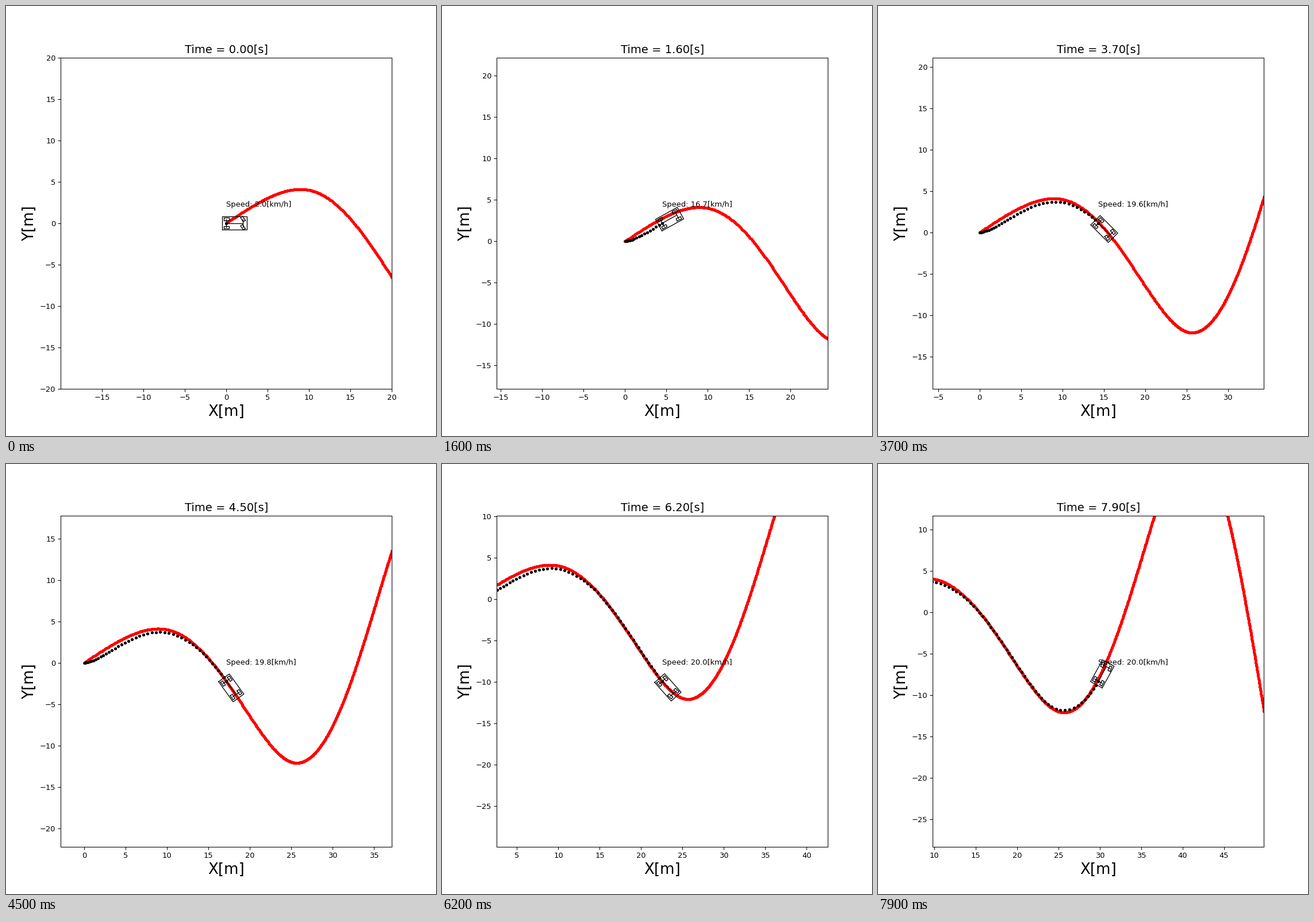
These frames come from a looping animation (748x748 px, 8 s). A matplotlib script:

```python
import math

import matplotlib.pyplot as plt
import numpy as np
from matplotlib.animation import FuncAnimation

DT = 0.1
FRAMES = 80
VIEW = 20.0

# vehicle dimensions [m]
WHEEL_BASE = 2.0
FRONT, REAR, HALF_WIDTH = 2.5, 0.5, 0.8
TIRE_R, TIRE_W, AXLE_HALF = 0.3, 0.15, 0.5

# controller
TARGET_SPEED = 20.0 / 3.6
SPEED_GAIN = 1.0
STEER_GAIN = 0.5

WAY_X = [0.0, 10.0, 25.0, 40.0, 50.0]
WAY_Y = [0.0, 4.0, -12.0, 20.0, -13.0]


def natural_spline(s, v, t):
    """Value and slope at t of the natural cubic spline through (s, v)."""
    s, v = np.asarray(s), np.asarray(v)
    n, h = len(s), np.diff(s)
    d = np.diff(v) / h
    a, b = np.eye(n), np.zeros(n)
    for i in range(1, n - 1):
        a[i, i - 1:i + 2] = h[i - 1], 2 * (h[i - 1] + h[i]), h[i]
        b[i] = 6 * (d[i] - d[i - 1])
    m = np.linalg.solve(a, b)
    i = np.clip(np.searchsorted(s, t, side="right") - 1, 0, n - 2)
    u = t - s[i]
    c1 = d[i] - h[i] * (2 * m[i] + m[i + 1]) / 6
    c3 = (m[i + 1] - m[i]) / (6 * h[i])
    value = v[i] + c1 * u + m[i] / 2 * u**2 + c3 * u**3
    slope = c1 + m[i] * u + 3 * c3 * u**2
    return value, slope


def build_course():
    s = np.concatenate([[0], np.cumsum(np.hypot(np.diff(WAY_X), np.diff(WAY_Y)))])
    t = np.arange(0, s[-1], 0.1)
    x, dx = natural_spline(s, WAY_X, t)
    y, dy = natural_spline(s, WAY_Y, t)
    return x, y, np.arctan2(dy, dx)


def wrap(angle):
    return (angle + math.pi) % (2 * math.pi) - math.pi


def simulate(cx, cy, cyaw):
    """Stanley path tracking; rows of x, y, yaw, speed, steer."""
    x = y = yaw = speed = 0.0
    rows = []
    for _ in range(FRAMES):
        fx = x + WHEEL_BASE * math.cos(yaw)
        fy = y + WHEEL_BASE * math.sin(yaw)
        i = int(np.argmin(np.hypot(cx - fx, cy - fy)))
        lateral = (fx - cx[i]) * math.sin(cyaw[i]) - (fy - cy[i]) * math.cos(cyaw[i])
        steer = wrap(cyaw[i] - yaw) + math.atan2(STEER_GAIN * lateral, speed)
        accel = SPEED_GAIN * (TARGET_SPEED - speed)
        yaw_rate = speed / WHEEL_BASE * math.tan(steer)

        step = speed * DT + 0.5 * accel * DT**2
        x += step * math.cos(yaw)
        y += step * math.sin(yaw)
        yaw += yaw_rate * DT
        speed += accel * DT
        rows.append((x, y, yaw, speed, steer))
    return np.array(rows)


def box(x0, x1, y0, y1):
    return np.array([[x0, x1, x1, x0, x0], [y0, y0, y1, y1, y0]])


def place(shape, angle, x, y):
    c, s = math.cos(angle), math.sin(angle)
    return np.array([[c, -s], [s, c]]) @ shape + np.array([[x], [y]])


BODY = box(-REAR, FRONT, -HALF_WIDTH, HALF_WIDTH)
TIRE = box(-TIRE_R, TIRE_R, -TIRE_W, TIRE_W)
AXLE = np.array([[0, 0], [-AXLE_HALF, AXLE_HALF]])
SHAFT = np.array([[0, WHEEL_BASE], [0, 0]])


def vehicle_parts(steer):
    parts = [BODY, SHAFT, AXLE, place(AXLE, 0, WHEEL_BASE, 0)]
    for side in (AXLE_HALF, -AXLE_HALF):
        parts.append(place(TIRE, 0, 0, side))
        parts.append(place(TIRE, steer, WHEEL_BASE, side))
    return parts


course_x, course_y, course_yaw = build_course()
states = simulate(course_x, course_y, course_yaw)

fig = plt.figure(figsize=(8, 8), dpi=93.5)
ax = fig.add_subplot(111)
ax.set_aspect("equal")
ax.set_xlabel("X[m]", fontsize=20)
ax.set_ylabel("Y[m]", fontsize=20)
title = ax.set_title("", fontsize=15)

ax.plot(course_x, course_y, "r.")
outlines = [ax.plot([], [], "k-", lw=1)[0] for _ in vehicle_parts(0)]
trace, = ax.plot([], [], "k.")
label = ax.text(0, 0, "", fontsize=10)


def update(n):
    x, y, yaw, speed, steer = states[n]
    ax.set_xlim(x - VIEW, x + VIEW)
    ax.set_ylim(y - VIEW, y + VIEW)
    title.set_text(f"Time = {n * DT:.2f}[s]")
    for line, part in zip(outlines, vehicle_parts(steer)):
        line.set_data(*place(part, yaw, x, y))
    trace.set_data(states[:n + 1, 0], states[:n + 1, 1])
    label.set_position((x, y + 2))
    label.set_text(f"Speed: {speed * 3.6:.1f}[km/h]")
    return [*outlines, trace, label, title]


anim = FuncAnimation(fig, update, frames=FRAMES, interval=100,
                     repeat=True, repeat_delay=0, blit=False)
plt.show()
```
